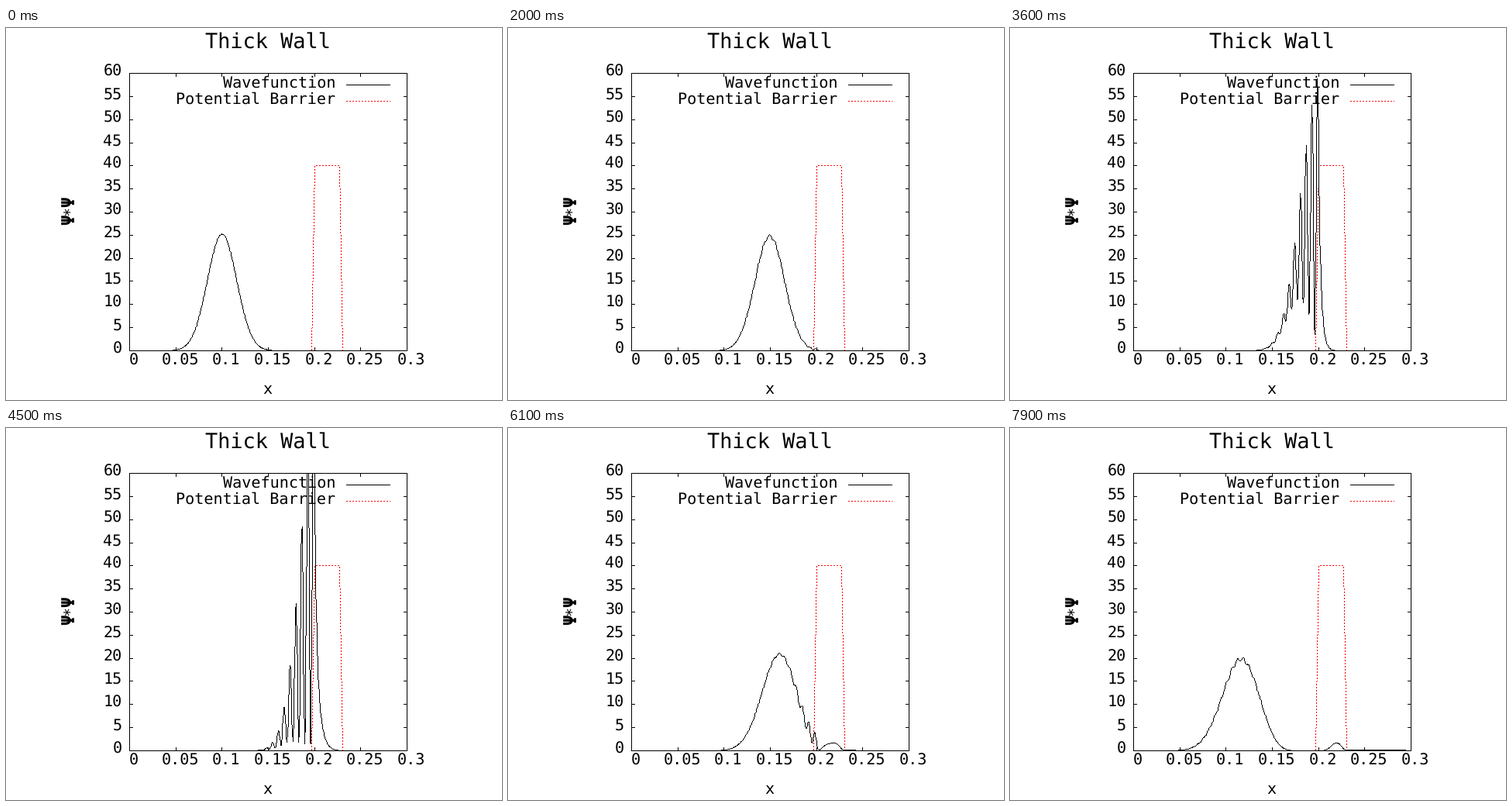
A matplotlib script for the animation above (8 s loop, 640 by 480 pixels).

```python
import numpy as np
import matplotlib.pyplot as plt
from matplotlib.animation import FuncAnimation

FRAMES, INTERVAL = 80, 100
LEFT, RIGHT, TOP, BOTTOM = 159, 517, 58, 416
XMAX, YMAX = 0.3, 60


def to_px(x, y):
    """Data to whole stage pixels."""
    px = LEFT + np.asarray(x) / XMAX * (RIGHT - LEFT)
    py = BOTTOM - np.asarray(y) / YMAX * (BOTTOM - TOP)
    return np.rint(px), np.rint(py)


# Schroedinger equation (hbar = m = 1), staggered real/imaginary steps
DX, DT, STEPS = 0.0005, 2e-7, 25
WALL = (0.2, 0.23)
K0, X0, WIDTH2 = 500, 0.1, 0.001

grid = np.arange(0, 1201) * DX
inside = (grid > WALL[0] - DX / 2) & (grid < WALL[1] + DX / 2)
potential = np.where(inside, 1.5e5, 0.0)


def hamiltonian(f):
    out = np.zeros_like(f)
    out[1:-1] = (-(f[2:] - 2 * f[1:-1] + f[:-2]) / (2 * DX**2)
                 + potential[1:-1] * f[1:-1])
    return out


def simulate():
    norm = (2 / (np.pi * WIDTH2)) ** 0.25
    psi = norm * np.exp(-(grid - X0) ** 2 / WIDTH2 + 1j * K0 * grid)
    re, im = psi.real.copy(), psi.imag.copy()
    shown = grid <= XMAX + DX / 2
    densities = []
    for _ in range(FRAMES):
        densities.append((re**2 + im**2)[shown])
        for _ in range(STEPS):
            re += DT * hamiltonian(im)
            im -= DT * hamiltonian(re)
    return grid[shown], densities


xs, densities = simulate()

plt.rcParams.update({"font.family": "DejaVu Sans Mono",
                     "text.hinting": "none", "path.simplify": False})
fig = plt.figure(figsize=(640 / 72, 480 / 72), dpi=72, facecolor="white")
ax = fig.add_axes([0, 0, 1, 1])
ax.set_xlim(-0.5, 639.5)
ax.set_ylim(479.5, -0.5)
ax.axis("off")


def trace(px, py, dash=None):
    """Hard-edged polyline as a run of one-pixel strokes."""
    cx, cy = [px[:1]], [py[:1]]
    for x0, y0, x1, y1 in zip(px[:-1], py[:-1], px[1:], py[1:]):
        n = int(max(abs(x1 - x0), abs(y1 - y0)))
        t = np.arange(1, n + 1) / max(n, 1)
        cx.append(np.rint(x0 + (x1 - x0) * t))
        cy.append(np.rint(y0 + (y1 - y0) * t))
    cx, cy = np.concatenate(cx), np.concatenate(cy)
    keep = (cy >= TOP) & (cy <= BOTTOM)
    if dash:
        on, off = dash
        keep &= np.arange(len(cx)) % (on + off) < on
    cx, cy = cx[keep], cy[keep]
    gap = np.full(len(cx), np.nan)
    return (np.column_stack([cx - 0.5, cx + 0.5, gap]).ravel(),
            np.column_stack([cy, cy, gap]).ravel())


def line(px, py, color="black", z=3, dash=None):
    return ax.plot(*trace(px, py, dash), color=color, lw=1, snap=False,
                   solid_capstyle="butt", zorder=z)[0]


def label(x, y, text, ha="center", size=20.15, **kw):
    kw.setdefault("va", "baseline")
    ax.text(x - 0.5, y - 0.5, text, ha=ha, fontsize=size, **kw)


# Frame and mirrored inward ticks
line([LEFT, RIGHT, RIGHT, LEFT, LEFT], [BOTTOM, BOTTOM, TOP, TOP, BOTTOM], z=5)
for v in np.arange(7) * 0.05:
    px = to_px(v, 0)[0]
    line([px, px], [BOTTOM, BOTTOM - 4], z=5)
    line([px, px], [TOP, TOP + 4], z=5)
    label(px + 5.5, 435, f"{v:.2g}")
for v in range(0, 61, 5):
    py = to_px(0, v)[1]
    line([LEFT, LEFT + 4], [py, py], z=5)
    line([RIGHT, RIGHT - 4], [py, py], z=5)
    label(149.5, py + 4, str(v), ha="right")

# Title, axis names, legend
label(338, 27, "Thick Wall", size=26.85)
label(337.5, 472, "x")
for cy in (247.5, 224):
    label(93, cy, "Ψ", ha="right", va="center", size=22.5,
          weight="bold", rotation=90)
label(84, 236, "*", va="center", rotation=90)
label(425.5, 77, "Wavefunction", ha="right")
label(425.5, 98, "Potential Barrier", ha="right")
DOTS = dict(color="red", dash=(2, 2))
line([439, 495], [73, 73])
line([439, 495], [94, 94], **DOTS)

# Barrier, sampled at 100 points across the axis
bx = np.linspace(0, XMAX, 100)
by = np.where((bx > WALL[0] - 1e-9) & (bx <= WALL[1]), 40, 0)
line(*to_px(bx, by), **DOTS)

wave = line([LEFT], [BOTTOM], z=4)


def update(i):
    wave.set_data(*trace(*to_px(xs, densities[i % FRAMES])))
    return (wave,)


anim = FuncAnimation(fig, update, frames=FRAMES, interval=INTERVAL,
                     init_func=lambda: update(0), repeat=True, repeat_delay=0)
plt.show()
```
